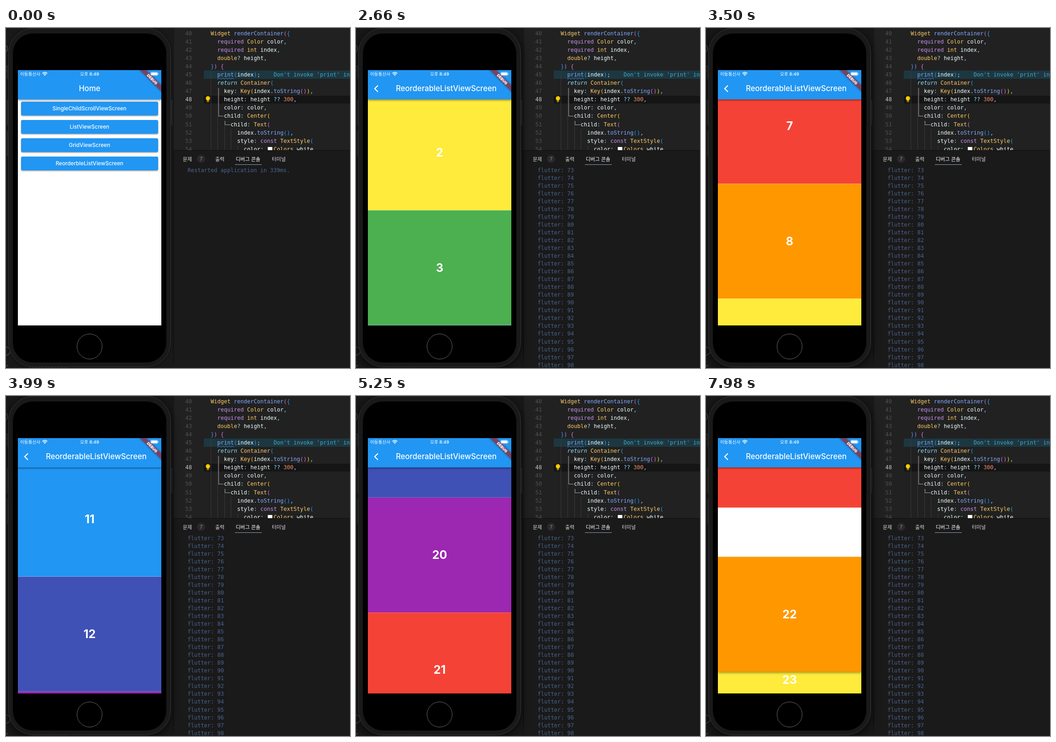
Animation, 753 px wide and 743 px high, one loop 8 s. Source, as an HTML page:

```html
<!DOCTYPE html>
<html lang="ko">
<head>
<meta charset="utf-8">
<style>
html, body { margin: 0; width: 100%; height: 100%; overflow: hidden; background: #191919; }
div, svg { position: absolute; box-sizing: border-box; }
#stage { width: 753px; height: 743px; overflow: hidden; background: #191919; font-family: Inter, "Noto Sans CJK KR", "Noto Sans CJK", sans-serif; }
.mono { font: 12px "DejaVu Sans Mono", monospace; white-space: pre; }

#editor { left: 368px; top: 0; width: 385px; height: 267px; background: #212121; overflow: hidden; }
#editor .mono { font-size: 12.06px; line-height: 18.04px; }
#code { left: 65.4px; top: 3px; color: #eeffff; }
#nums { right: 346px; top: 3px; color: #505050; text-align: right; }
.guide { width: 1px; bottom: 0; background: #393939; }
.branch { border: solid #a5a5a5; border-width: 0 0 1px 1px; }
.y { color: #ffcb6b } .b { color: #82aaff } .p { color: #c792ea } .c { color: #89ddff }
.n { color: #f78c6c } .h { color: #3fa9cc } .w { color: #eeffff }
.g { color: #ffd700 } .m { color: #da70d6 } .u { color: #179fff }
.r { color: #89ddff; font-style: italic }
.q { color: #82aaff; text-decoration: underline wavy #3f8fe0 1px; text-underline-offset: 2px }

#panel { left: 368px; top: 267px; width: 385px; height: 476px; background: #1a1a1a; border-top: 1px solid #0e0e0e; overflow: hidden; }
.tab { top: 9px; font: 500 11px/18px "Noto Sans CJK KR", "Noto Sans CJK", sans-serif; color: #d8d8d8; white-space: nowrap; }
#log { left: 29.5px; top: 34.5px; line-height: 17.04px; color: #4c6391; }

#phone { left: 5px; top: 0; width: 356px; height: 741px; border-radius: 54px; background: #191919; border: 1px solid #363636; box-shadow: 0 0 5px rgba(0,0,0,.6); }
#phone.front { box-shadow: 0 4px 22px rgba(0,0,0,.75); }
#glass { left: 9px; top: 11px; width: 336px; height: 719px; border-radius: 44px; background: #000; }
.key { width: 3px; background: #242424; border: 1px solid #303030; }
#homekey { left: 155px; top: 668px; width: 56px; height: 56px; border: 1.5px solid #6a6a6a; border-radius: 50%; }

#screen { left: 26px; top: 92px; width: 314px; height: 558px; overflow: hidden; background: #fff; color: #fff; }
.page { width: 314px; height: 558px; background: #fff; overflow: hidden; }
.bar { width: 314px; height: 63.5px; background: #2196f3; box-shadow: 0 1.5px 4px rgba(0,0,0,.42); z-index: 9; }
.title { top: 30px; width: 100%; font-size: 16.7px; font-weight: 500; line-height: 20px; text-align: center; white-space: nowrap; }
.button { left: 6.5px; width: 300.5px; height: 30px; border-radius: 3.3px; background: #2196f3; box-shadow: 0 1.5px 2.5px rgba(0,0,0,.4); font-size: 11.7px; font-weight: 500; line-height: 30px; text-align: center; }
.tile { width: 314px; height: 251.2px; font-size: 25.1px; font-weight: 700; line-height: 251px; text-align: center; }
.status { top: 1px; font: 500 9.6px/15px Inter, "Noto Sans CJK KR", "Noto Sans CJK", sans-serif; white-space: nowrap; z-index: 20; }
#debug { left: 254px; top: 15px; width: 80px; height: 10px; transform: rotate(45deg); background: rgba(160,28,28,.66); box-shadow: 0 0 4px rgba(0,0,0,.45); font: 900 8.3px/10px Inter, sans-serif; text-align: center; }
</style>
</head>
<body>
<div id="stage">
  <div id="editor">
    <div style="left:65px;top:93px;width:320px;height:18px;background:#1d3740"></div>
    <div style="left:65px;top:148px;width:320px;height:17px;background:#151515"></div>
    <div class="guide" style="left:80px;top:93px"></div>
    <div class="guide" style="left:95px;top:131px"></div>
    <div class="guide" style="left:110px;top:203px"></div>
    <div class="guide" style="left:124px;top:221px"></div>
    <div class="guide" style="left:139px;top:257px"></div>
    <div class="branch" style="left:97px;top:131px;width:11px;height:62px"></div>
    <div class="branch" style="left:111px;top:203px;width:12px;height:9px"></div>
    <div id="nums" class="mono"></div>
    <div id="code" class="mono"></div>
    <div style="left:205px;top:260px;width:10px;height:10px;background:#fff"></div>
    <svg style="left:68px;top:148px" width="12" height="16">
      <path d="M6 1a4.6 4.6 0 0 0-2.6 8.4V11h5.2V9.400A4.600 4.600 0 0 0 6 1z" fill="#ffcc00"/>
      <path d="M3.700 12h4.600v1.800H3.700z" fill="#c9a227"/>
    </svg>
  </div>

  <div id="panel">
    <div class="tab" style="left:19px">문제</div>
    <div style="left:50px;top:9px;width:18px;height:18px;border-radius:9px;background:#292929;color:#8c8c8c;font-size:11px;line-height:18px;text-align:center">7</div>
    <div class="tab" style="left:90px">출력</div>
    <div class="tab" style="left:135px;color:#fff">디버그 콘솔</div>
    <div class="tab" style="left:214px">터미널</div>
    <div style="left:133px;top:30px;width:59px;height:1px;background:#8ba3bd"></div>
    <div id="log" class="mono"></div>
  </div>

  <svg width="368" height="743" fill="none" stroke="#4a4a4a">
    <path d="M0 38q7 7 0 14M0 84h4v9H0M0 697a7 7 0 0 1 0 18M0 738h5" stroke-width="1.500"/>
    <path d="M78 .5h96M50 742.500h86" stroke="#383838" stroke-dasharray="4 3"/>
    <path d="M366.500 268v467" stroke="#0b0b0b"/>
  </svg>

  <div class="key" style="left:2px;top:82px;height:29px"></div>
  <div class="key" style="left:2px;top:157px;height:55px"></div>
  <div class="key" style="left:2px;top:225px;height:55px"></div>
  <div class="key" style="left:361px;top:157px;height:55px"></div>
  <div id="phone"><div id="glass"></div></div>
  <div id="homekey"></div>

  <div id="screen">
    <div id="home" class="page">
      <div class="bar"><div class="title">Home</div></div>
    </div>
    <div id="list" class="page">
      <div class="bar">
        <svg width="40" height="63"><path d="M22 33.500l-7 7 7 7" fill="none" stroke="#fff" stroke-width="2.200"/></svg>
        <div class="title" style="left:14.500px">ReorderableListViewScreen</div>
      </div>
    </div>
    <div id="debug">DEBUG</div>
    <div class="status" style="left:5px">이동통신사</div>
    <div class="status" style="width:314px;text-align:center">오후 8:49</div>
    <svg class="status" width="314" height="17" style="top:0" fill="none" stroke="#fff">
      <path d="M53.500 7.200q5.500-4.800 11 0M55.500 9.300q3.500-3 7 0" stroke-width="1.600"/>
      <path d="M57.200 10.800q1.800-1.500 3.600 0L59 12.800z" fill="#fff" stroke="none"/>
      <rect x="290.500" y="4.500" width="16" height="7.500" rx="2" stroke-opacity=".5"/>
      <rect x="291.500" y="5.500" width="14" height="5.500" rx="1.200" fill="#fff" stroke="none"/>
      <path d="M308 7v3" stroke-opacity=".6"/>
    </svg>
  </div>
</div>

<script>
const $ = id => document.getElementById(id);
const clamp = v => Math.min(1, Math.max(0, v));

function add(parent, className, text, style) {
  const el = document.createElement('div');
  el.className = className;
  el.textContent = text;
  Object.assign(el.style, style);
  return parent.appendChild(el);
}

// "~x" switches to colour class x
const source = `  ~yWidget ~brenderContainer~m(~u{
    ~prequired ~yColor ~wcolor~c,
    ~prequired ~yint ~windex~c,
    ~ydouble~c? ~wheight~c,
  ~u}~m) {
    ~qprint~u(~windex~u)~c;    ~hDon't invoke 'print' in production code.
    ~rreturn ~yContainer~u(
      ~wkey~c: ~yKey~g(~windex~c.~btoString~m()~g)~c,
      ~wheight~c: ~wheight ~c?? ~n300~c,
      ~wcolor~c: ~wcolor~c,
      ~wchild~c: ~yCenter~g(
        ~wchild~c: ~yText~m(
          ~windex~c.~btoString~u()~c,
          ~wstyle~c: ~pconst ~yTextStyle~u(
            ~wcolor~c:   ~yColors~c.~wwhite~c,`;
$('code').innerHTML = source.replace(/~(\w)([^~]*)/g, '<span class="$1">$2</span>');
$('nums').innerHTML = Array.from({ length: 15 }, (_, i) =>
  i === 8 ? '<span style="color:#c6c6c6">48</span>' : 40 + i).join('\n');

['SingleChildScrollViewScreen', 'ListViewScreen', 'GridViewScreen', 'ReorderbleListViewScreen']
  .forEach((name, i) => add($('home'), 'button', name, { top: 69 + 40 * i + 'px' }));

const TILE = 251.2, TOP = 63.5, HELD = 22;
const rainbow = ['#f44336', '#ff9800', '#ffeb3b', '#4caf50', '#2196f3', '#3f51b5', '#9c27b0'];
const tiles = Array.from({ length: 25 }, (_, i) =>
  add($('list'), 'tile', i, { background: rainbow[i % 7], zIndex: i === HELD ? 2 : 1 }));

const firstLog = 'Restarted application in 339ms.';
const fullLog = Array.from({ length: 27 }, (_, i) => 'flutter: ' + (73 + i)).join('\n');

// time, scroll offset, speed
const flicks = [[2380, 0, 1.3], [2660, 510.6, 1.75], [3500, 1824.6, 1.65],
  [4480, 3762.5, 1.8], [5250, 4957.5, 1.35], [5810, 5437.9, 0]];

function scrollAt(t) {
  if (t <= flicks[0][0]) return 0;
  const i = flicks.findIndex(k => k[0] >= t);
  if (i < 0) return flicks[flicks.length - 1][1];
  const [t0, s0, v0] = flicks[i - 1], [t1, s1, v1] = flicks[i];
  const d = t1 - t0, u = (t - t0) / d, w = 1 - u;
  return w * w * ((1 + 2 * u) * s0 + u * d * v0) + u * u * ((3 - 2 * u) * s1 - w * d * v1);
}

function draw(t) {
  $('phone').classList.toggle('front', t >= 1260);
  const log = t < 1470 ? firstLog : fullLog;
  if ($('log').textContent !== log) $('log').textContent = log;

  const push = t < 1400 ? 0 : 1 - (1 - clamp((t - 1350) / 400)) ** 3.5;
  $('home').style.transform = `translateX(${-314 / 3 * push}px)`;
  $('list').style.transform = `translateX(${314 * (1 - push)}px)`;
  $('list').style.boxShadow = push && push < .99 ? '0 0 12px rgba(0,0,0,.3)' : 'none';

  const scroll = scrollAt(t);
  const drag = 107.5 * clamp((t - 7710) / 270) ** 1.15;
  const lift = t < 7000 ? 0 : clamp((t - 6900) / 590);
  tiles.forEach((tile, i) => {
    const y = TOP + i * TILE - scroll + (i === HELD ? drag : 0);
    tile.style.transform = `translateY(${y}px)`;
  });
  tiles[HELD].style.boxShadow = lift ? `0 ${2.5 * lift}px ${5 * lift}px rgba(0,0,0,${.38 * lift})` : 'none';
}

function tick() {
  draw(Math.floor(performance.now() % 8000 / 70) * 70);
  requestAnimationFrame(tick);
}
tick();
</script>
</body>
</html>
```
